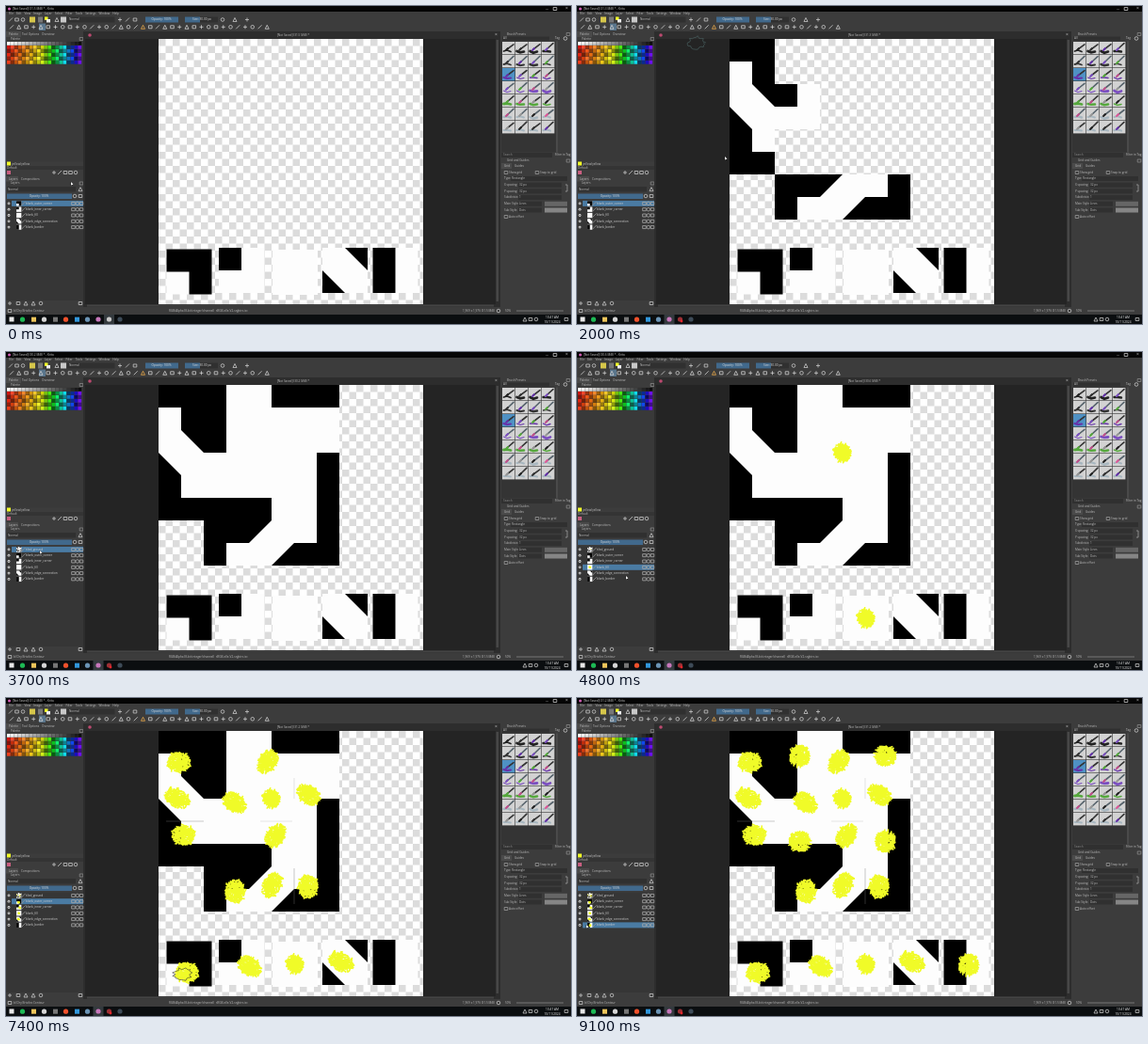
Recreate the animation shown at these times as an HTML page with a canvas. Size 600x338 px, loop 9200 ms.

```html
<!DOCTYPE html>
<html lang="en">
<head>
<meta charset="utf-8">
<title>Tile painting</title>
<style>
html, body { margin: 0; width: 100%; height: 100%; overflow: hidden; background: #262626; }
canvas { display: block; }
</style>
</head>
<body>
<canvas id="stage" width="600" height="338"></canvas>
<script>
const LOOP = 9200, STEP = 100, CELL = 48;
const MAP = { x: 162, y: 35, size: 281 };
const YELLOW = '#f0fb28', BLUE = '#41698c', PANEL = '#3c3c3c', FIELD = '#303030', TEXT = '#bdbdbd';
const stage = document.getElementById('stage').getContext('2d');
let ctx = stage;

// black: polygons around the tile centre; blob: dx, dy, rx, ry, tilt; paint: start and end time
const tiles = {
  outer: { at: [194.5, 282.5], black: [[-24, -24, 24, -24, 24, 24, 0, 24, 0, 0, -24, 0]],
    blob: [-2.5, 9.5, 13, 12, 0], paint: [6850, 7500] },
  inner: { at: [250, 281], black: [[-24, -24, 0, -24, 0, 0, -24, 0]],
    blob: [9, 4, 14, 10, 0.5], paint: [5900, 6400] },
  fill: { at: [307, 283], black: [], blob: [-0.5, 0, 9, 11, -0.3], paint: [4000, 4500] },
  edge: { at: [360, 281], black: [[0, -24, 24, -24, 24, 0], [-24, 0, 0, 24, -24, 24]],
    blob: [-4, -1, 15, 10, 0.5], paint: [5100, 5600] },
  border: { at: [413.5, 281], black: [[-24, -24, 0, -24, 0, 24, -24, 24]],
    blob: [2, 2.5, 11.5, 12, 0], paint: [7950, 8600] }
};

// kind, column, row, quarter turns, in order of placement
const placed = [
  ['outer', 0, 0, 0], ['outer', 0, 2, 2], ['outer', 1, 3, 3], ['outer', 3, 3, 1],
  ['edge', 0, 1, 0], ['edge', 2, 3, 1], ['inner', 1, 1, 0], ['inner', 2, 0, 1],
  ['inner', 3, 1, 2], ['inner', 2, 2, 3], ['fill', 2, 1, 0], ['border', 1, 0, 0],
  ['border', 3, 0, 1], ['border', 1, 2, 3], ['border', 3, 2, 2]
];
const placedAt = i => i < 7 ? 350 + i * 250 : 2100 + (i - 7) * 110;

const layers = [['tiled_ground'], ['blank_outer_corner', 'outer'], ['blank_inner_corner', 'inner'],
  ['blank_fill', 'fill'], ['blank_edge_connection', 'edge'], ['blank_border', 'border']];
const selections = [[0, 0], [3900, 3], [4950, 4], [5800, 2], [6700, 1], [7800, 5]];
const pointer = [[0, 69, 187], [350, 186, 90], [800, 240, 205], [1500, 280, 205], [2000, 157, 160],
  [2500, 280, 140], [2950, 60, 212], [3700, 36, 211], [3900, 30, 229], [4000, 306, 283],
  [4500, 306, 283], [4800, 52, 238], [4950, 30, 236], [5100, 356, 281], [5600, 356, 281],
  [5800, 30, 223], [5900, 257, 282], [6400, 257, 282], [6700, 30, 217], [6850, 190, 292],
  [7500, 190, 292], [7800, 30, 242], [7950, 415, 283], [8600, 415, 283], [8800, 10, 241], [9200, 10, 241]];

function seeded(seed) {
  return () => (seed = (seed * 16807) % 2147483647) / 2147483647;
}
function rect(x, y, w, h, color) {
  ctx.fillStyle = color;
  ctx.fillRect(x, y, w, h);
}
function dot(x, y, r, color) {
  ctx.fillStyle = color;
  ctx.beginPath();
  ctx.arc(x, y, r, 0, 7);
  ctx.fill();
}
function line(points, color, width = 0.7) {
  ctx.strokeStyle = color;
  ctx.lineWidth = width;
  ctx.beginPath();
  for (let i = 0; i < points.length; i += 2) ctx.lineTo(points[i], points[i + 1]);
  ctx.stroke();
}
function polygon(points, color) {
  ctx.fillStyle = color;
  ctx.beginPath();
  for (let i = 0; i < points.length; i += 2) ctx.lineTo(points[i], points[i + 1]);
  ctx.fill();
}
function text(str, x, y, color = TEXT, size = 3.1, align = 'left') {
  ctx.font = `${size}px "Open Sans", sans-serif`;
  ctx.textAlign = align;
  ctx.textBaseline = 'middle';
  ctx.fillStyle = color;
  ctx.fillText(str, x, y);
}
function icon(x, y, kind, color = '#c4c4c4') {
  ctx.strokeStyle = color;
  ctx.lineWidth = 0.8;
  ctx.beginPath();
  if (kind === 0) { ctx.moveTo(x - 2, y + 2); ctx.lineTo(x + 2, y - 2); }
  if (kind === 1) ctx.rect(x - 1.8, y - 1.5, 3.6, 3);
  if (kind === 2) ctx.arc(x, y, 1.8, 0, 7);
  if (kind === 3) { ctx.moveTo(x - 2, y + 2); ctx.lineTo(x, y - 2); ctx.lineTo(x + 2, y + 2); ctx.closePath(); }
  if (kind === 4) { ctx.moveTo(x - 2, y); ctx.lineTo(x + 2, y); ctx.moveTo(x, y - 2); ctx.lineTo(x, y + 2); }
  ctx.stroke();
}

function scribble([dx, dy, rx, ry, tilt], progress, seed) {
  const random = seeded(seed);
  const count = Math.round(progress * 170);
  ctx.save();
  ctx.translate(dx, dy);
  ctx.rotate(tilt);
  ctx.strokeStyle = YELLOW;
  ctx.lineWidth = 1.6;
  ctx.beginPath();
  for (let i = 0; i < count; i++) {
    const a = random() * 6.283, r = Math.pow(random(), 0.6) * 0.9, turn = random() * 3.14;
    const x = Math.cos(a) * r * rx, y = Math.sin(a) * r * ry;
    const u = Math.cos(turn) * 2.6, v = Math.sin(turn) * 2.6;
    ctx.moveTo(x - u, y - v);
    ctx.lineTo(x + u, y + v);
  }
  ctx.stroke();
  ctx.restore();
}
function drawTile(kind, x, y, turns, time, scale = 1) {
  const { black, blob, paint: [start, end] } = tiles[kind];
  ctx.save();
  ctx.translate(x, y);
  ctx.rotate(turns * Math.PI / 2);
  ctx.scale(scale, scale);
  rect(-24, -24, CELL, CELL, '#fdfdfd');
  black.forEach(points => polygon(points, '#000'));
  const progress = Math.min(1, (time - start) / (end - start) * 1.3);
  if (progress > 0) scribble(blob, progress, 977 + start);
  ctx.restore();
}
function drawMap(time) {
  placed.forEach(([kind, col, row, turns], i) => {
    if (time >= placedAt(i)) drawTile(kind, (col + 0.5) * CELL, (row + 0.5) * CELL, turns, time);
  });
  if (time > tiles.inner.paint[0]) {
    line([144, 50, 144, 72], '#bbb', 0.4);
    line([108, 96, 142, 96], '#bbb', 0.4);
  }
  if (time > tiles.outer.paint[0]) {
    line([8, 96, 48, 96], '#777', 0.4);
    line([144, 146, 144, 184], '#777', 0.4);
  }
}

function drawPalette() {
  for (let row = 0; row < 6; row++) for (let col = 0; col < 20; col++) {
    const half = col % 10, left = col < 10;
    const hue = left ? (half * 6.5 + row * 2) : 85 + half * 20;
    const light = left ? 24 + ((half * 3 + row * 5) % 9) * 4 : 20 + ((half * 2 + row * 4) % 8) * 5;
    const color = row ? `hsl(${hue} 88% ${light}%)` : `hsl(0 0% ${left ? 100 - half * 5 : 50 - half * 5}%)`;
    rect(1 + col * 4 - (left ? 0 : 0.5), 38 + row * 4, 3.7, 3.7, color);
  }
}
function drawPresets() {
  const random = seeded(41);
  const accents = ['#222', '#333', '#63a', '#7b4fc0', '#55a83c', '#c0508c', '#999'];
  for (let row = 0; row < 7; row++) for (let col = 0; col < 4; col++) {
    const x = 527 + col * 14, y = 38 + row * 14;
    rect(x, y, 13.4, 13.4, row === 2 && !col ? '#4f91c4' : '#d2d2d2');
    ctx.lineCap = 'round';
    line([x + 1.5, y + 10, x + 5, y + 9 + random() * 3, x + 9, y + 10.5], row > 4 ? '#a7b6bf' : accents[row], 1 + random() * 2);
    line([x + 5, y + 8, x + 12, y + 1 + random() * 2], row % 2 ? '#54616a' : '#333', 1.6);
    line([x + 4, y + 9, x + 6, y + 7], row === 5 && col === 3 ? '#e05a9a' : accents[(row + col) % 7], 2);
    ctx.lineCap = 'butt';
  }
}

function drawInterface() {
  rect(0, 0, 600, 338, PANEL);
  rect(0, 0, 600, 6, '#050505');
  dot(3.5, 3, 1.5, '#d45db5');
  text('—', 573, 3); icon(583, 3, 1); text('×', 594, 3, TEXT, 5);
  'File Edit View Image Layer Select Filter Tools Settings Window Help'.split(' ')
    .reduce((x, word) => { text(word, x, 8); return x + ctx.measureText(word).width + 3; }, 3);

  [5, 11.5, 18, 54, 121, 129, 137, 230, 243, 256].forEach((x, i) => icon(x, 14.5, i % 5));
  rect(25, 11.5, 6, 6, '#d6c64a');
  rect(34, 11.5, 5, 6, '#777');
  rect(41, 11.5, 3.5, 3.5, YELLOW);
  rect(43, 14, 4, 3.5, '#eee');
  rect(58, 11.5, 6, 6, '#c8c8c8');
  rect(65.5, 11.5, 50, 6, FIELD);
  text('Normal', 67, 14.5);
  rect(148, 11.5, 35, 6, BLUE);
  text('Opacity: 100%', 165, 14.5, '#ddd', 3.2, 'center');
  rect(190, 11.5, 35, 6, FIELD);
  rect(190, 11.5, 16, 6, BLUE);
  text('Size: 30.00 px', 208, 14.5, '#ddd', 3.2, 'center');
  rect(35, 18.5, 7, 7.5, '#59758c');
  for (let i = 0; i < 36; i++) icon(6 + i * 7.75, 22.3, (i * 3 + (i >> 2)) % 5, i === 18 ? '#e8a84a' : '#cfcfcf');

  // left dockers
  rect(0, 27, 16, 6, '#4a4a4a');
  text('Palette', 3, 30.5); text('Tool Options', 17, 30.5); text('Overview', 38, 30.5);
  text('Palette', 5, 35.2); icon(80, 35, 1, '#888');
  rect(0, 37.5, 82, 128, '#393939');
  drawPalette();
  rect(1, 165.5, 4, 4, YELLOW);
  text('yellow/yellow', 6, 167.7);
  rect(0, 170, 82, 4, '#343434');
  text('Default', 1, 172);
  rect(1, 175, 4, 4, '#c85e80');
  [51, 57, 63, 68.5, 74].forEach((x, i) => icon(x, 177, [4, 0, 1, 1, 2][i]));
  rect(0, 181, 13, 5.5, '#4a4a4a');
  text('Layers', 3, 184); text('Compositions', 16, 184);
  text('Layers', 5, 188.5); icon(80, 188.5, 1, '#888');
  rect(1, 192, 73, 5.5, FIELD);
  text('Normal', 2, 194.7); icon(79, 194.7, 3);
  rect(1, 199.5, 69, 5.5, BLUE);
  text('Opacity: 100%', 35, 202.2, '#ddd', 3.1, 'center');
  icon(73, 202, 2); icon(79, 202, 1);
  [4, 13, 21, 29, 37].forEach((x, i) => icon(x, 316, [4, 1, 3, 3, 2][i]));
  icon(79, 316, 1);

  // document
  rect(82, 27, 443, 293, '#2d2d2d');
  rect(84, 35, 436, 282, '#242424');
  dot(89, 31, 1.8, '#bd4a70');
  text('×', 519, 31, TEXT, 5);
  rect(520.5, 36, 2.5, 278, '#474747');
  rect(86, 317.5, 432, 2, '#444');
  ctx.save();
  ctx.beginPath();
  ctx.rect(MAP.x, MAP.y, MAP.size, MAP.size + 1);
  ctx.clip();
  rect(MAP.x, MAP.y, MAP.size, 283, '#fff');
  for (let y = 0; y < 38; y++) for (let x = y % 2; x < 38; x += 2)
    rect(MAP.x + x * 7.5, MAP.y + y * 7.5, 7.5, 7.5, '#dcdcdc');
  ctx.restore();

  // right dockers
  text('Brush Presets', 532, 29.8); icon(597, 30, 1, '#888');
  rect(527, 32.5, 50, 4, FIELD);
  text('All', 528, 34.5); text('Tag', 583, 34.5); icon(594, 34.5, 2);
  rect(526, 37.5, 58, 118, '#343434');
  drawPresets();
  rect(584, 37.5, 2, 118, '#4a4a4a');
  rect(526, 156, 54, 5, FIELD);
  text('Search', 528, 158.5, '#888'); text('Filter in Tag', 583, 158.5);
  text('Grid and Guides', 532, 164.5); icon(597, 164.5, 1, '#888');
  rect(526, 167, 11, 6, '#4a4a4a');
  text('Grid', 529, 170); text('Guides', 540, 170);
  icon(531, 177, 1, '#999'); text('Show grid', 534, 177);
  icon(564, 177, 1, '#999'); text('Snap to grid', 567, 177);
  ['Type:', 'X spacing:', 'Y spacing:', 'Subdivision:', 'Main Style:', 'Sub Style:'].forEach((label, i) => {
    const y = 183.5 + i * 6.7;
    text(label, 529, y);
    rect(i ? 544 : 536, y - 2.5, i > 3 ? 25 : i ? 46 : 60, 5, FIELD);
    text(['Rectangle', '32 px', '32 px', '1', 'Lines', 'Dots'][i], i ? 545 : 537, y);
    if (i > 3) rect(572, y - 2.5, 24, 5, i === 4 ? '#666' : '#858585');
  });
  line([594, 190, 596, 190, 596, 197, 594, 197], '#aaa');
  icon(531, 224, 1, '#999'); text('Auto offset', 534, 224);

  // status bar
  icon(4, 324, 1); text('b) Dry Bristles Contour', 8, 324);
  text('RGB/Alpha (8-bit integer/channel)  sRGB-elle-V2-srgbtrc.icc', 173, 324);
  text('1,969 x 1,976 (31.5 MiB)', 485, 324);
  icon(523, 324, 2); text('50%', 530, 324);
  rect(542, 323.5, 50, 1, '#777');

  // taskbar
  rect(0, 328, 600, 10, '#0b0e10');
  rect(3.5, 330.5, 5, 5, '#e8e8e8');
  ['#1db954', '#efc65b', '#d5d5d5', '#777', '#f0512c', '#3197dc', '#6b94b5']
    .forEach((color, i) => i % 2 ? rect(27 + (i - 1) * 11.5, 330.7, 5, 5, color) : dot(17.5 + i * 11.5, 333.2, 2.6, color));
  dot(121, 333, 2.6, '#3d4b58');
  [551, 557, 563].forEach((x, i) => icon(x, 333, [3, 1, 2][i]));
  text('10:47 AM', 580, 331.2, '#eee', 3.2, 'center');
  text('10/11/2024', 580, 335.7, '#eee', 3.2, 'center');
  icon(595, 333, 1);
}

function drawLayers(time) {
  const grouped = time >= 3100;
  const selected = selections.filter(([start]) => time >= start).pop()[1];
  rect(0, 206.5, 82, 106.5, '#363636');
  layers.slice(grouped ? 0 : 1).forEach(([name, kind], i) => {
    const y = 209.9 + i * 6.3;
    const typed = kind ? name : name.slice(0, Math.max(1, Math.ceil((time - 3050) / 300 * name.length)));
    if (i === selected) rect(6, y - 3, 76, 6, '#4a7ba3');
    dot(3, y, 1.4, '#ddd'); dot(3, y, 0.6, '#333');
    if (kind) drawTile(kind, 13.7, y, 0, time, 0.11);
    else {
      ctx.save();
      ctx.translate(11, y - 2.6);
      ctx.scale(0.0275, 0.0275);
      rect(0, 0, 192, 192, '#fff');
      drawMap(time);
      ctx.restore();
    }
    icon(18.6, y, 0, '#999');
    text(typed, 21, y, '#d0d0d0');
    [71.5, 75.8, 80].forEach((x, k) => icon(x, y, [1, 2, 1][k], '#aaa'));
  });
}

function brushOutline(x, y, seed, color) {
  const random = seeded(seed), points = [];
  for (let i = 0; i <= 26; i++) {
    const a = i / 26 * 6.283, r = 0.75 + random() * 0.4;
    points.push(x + Math.cos(a) * 9.5 * r, y + Math.sin(a) * 6.5 * r);
  }
  line(points, color, 0.6);
}
function drawPointer(time) {
  const next = Math.max(1, pointer.findIndex(([at]) => at > time));
  const [t0, x0, y0] = pointer[next - 1], [t1, x1, y1] = pointer[next];
  const k = (time - t0) / (t1 - t0);
  const x = x0 + (x1 - x0) * k, y = y0 + (y1 - y0) * k;
  const painting = Object.values(tiles).some(({ paint: [start, end] }) => time >= start && time <= end);
  if (painting) {
    brushOutline(x + Math.sin(time / 70) * 3, y + Math.cos(time / 90) * 2, 7 + time, '#333');
  } else {
    ctx.lineJoin = 'round';
    line([x, y, x, y + 3.6, x + 2.6, y + 2.6, x, y], '#111', 0.6);
    polygon([x, y, x, y + 3.5, x + 2.5, y + 2.5], '#fff');
  }
  if (time >= 1900 && time <= 2000) brushOutline(127, 39, 19, '#4e6868');
}

function drawDocument(time) {
  const size = time < 300 ? '31.5' : time < 2100 ? '31.3' : time < 4000 ? '30.2' : time < 6900 ? '30.6' : '31.2';
  const title = `[Not Saved] (${size} MiB) *`;
  text(`${title} - Krita`, 7, 3, '#ccc');
  text(title, 305, 31, TEXT, 3.1, 'center');
  for (const [kind, { at }] of Object.entries(tiles)) drawTile(kind, ...at, 0, time);
  ctx.save();
  ctx.translate(MAP.x, MAP.y);
  drawMap(time);
  ctx.restore();
}
function drawTaskbar(time) {
  const recording = time > 0;
  rect(recording ? 92.5 : 104, 328, 11, 10, '#343a3e');
  dot(98, 333, 2.6, '#c777bb');
  dot(109.5, 333, 2.6, recording ? '#9b3035' : '#c9c9c9');
  if (recording) dot(111, 335, 1.4, '#e8262b');
}

const backdrop = document.createElement('canvas');
backdrop.width = 600;
backdrop.height = 338;
ctx = backdrop.getContext('2d');
drawInterface();
ctx = stage;

function frame() {
  const time = Math.floor(performance.now() % LOOP / STEP) * STEP;
  ctx.drawImage(backdrop, 0, 0);
  drawDocument(time);
  drawLayers(time);
  drawTaskbar(time);
  drawPointer(time);
  requestAnimationFrame(frame);
}
frame();
</script>
</body>
</html>
```
